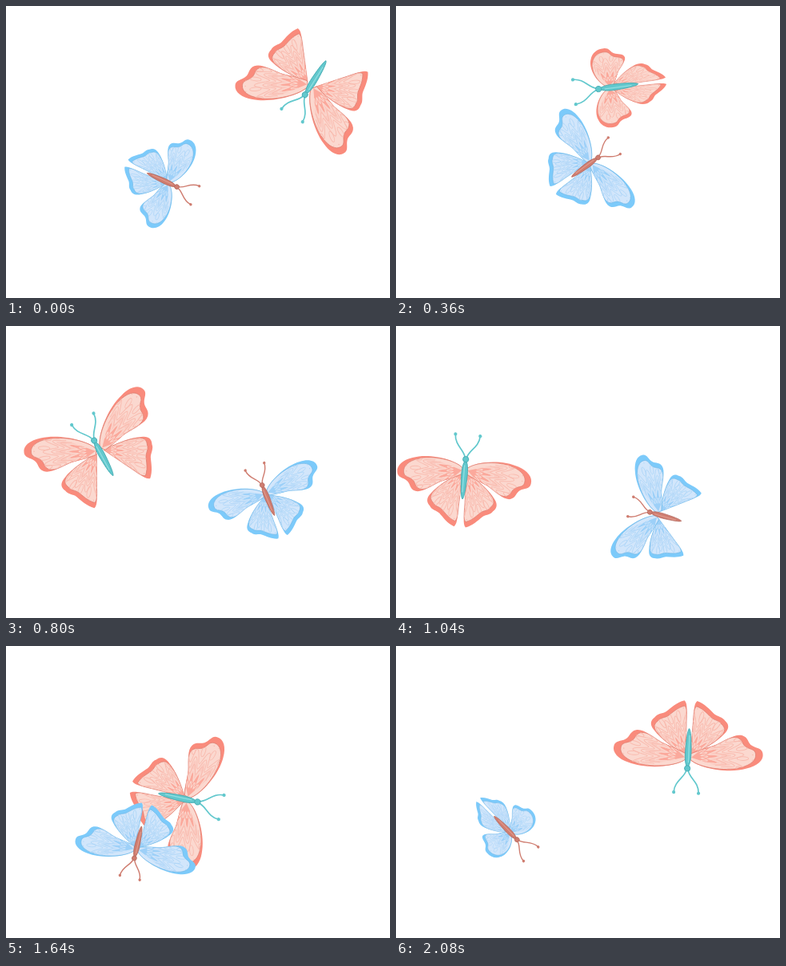
Recreate the animation shown at these times as an HTML page with a canvas. Size 480 by 366 pixels, loop 2.12 s.

```html
<!DOCTYPE html>
<html>
<head>
<meta charset="utf-8">
<style>
html, body { margin: 0; width: 100%; height: 100%; overflow: hidden; background: #fff; }
canvas { display: block; }
</style>
</head>
<body>
<canvas id="stage" width="480" height="366"></canvas>
<script>
const ctx = document.getElementById('stage').getContext('2d');
const STEP = 40, STEPS = 53, PERIOD = 56, RAD = Math.PI / 180;

// Right wing at rest, butterfly heading up, body centred on the origin.
const FORE = {
  shape: new Path2D('M3-14C15-24 52-28 74-20C87-16 95-8 93 0C92 7 84 6 79 9C73 12 74 19 66 21C56 23 46 13 34 7C22 2 10-2 3-6Z'),
  base: [4, -11], from: -14, to: 42, size: 92
};
const HIND = {
  shape: new Path2D('M3-8C14-2 34 8 45 22C50 28 49 33 44 37C41 42 34 42 30 45C24 50 18 57 8 60C3 56 5 44 4 30Z'),
  base: [3, -8], from: 32, to: 96, size: 70
};
const BODY = new Path2D('M0-24C4-20 4-8 3.6 0C3.2 10 2.4 22 .4 25C-2 24-3 10-3.6 0C-4-8-4-20 0-24Z');
const ANTENNA = new Path2D('M1-27C3-37 15-41 15.5-55');

// path: step, x, y, heading.  flap: step, wing angle, wing breadth.
const pink = {
  scale: 1, turn: 360,
  rim: '#f98b7c', edge: '#dd7d70', cell: '#fbd8cf', line: '#f9bcb0', heart: '#fb9f90',
  body: '#62c8cd', shade: '#43a9b0', glow: '#8fdde0',
  path: [[0, 387, 90, 122], [9, 278, 101, 173], [15, 178, 138, 215], [26, 85, 192, 275],
    [36, 161, 200, 349], [41, 215, 190, 372.6], [52, 365.5, 128.5, 453]],
  flap: [[0, 40, 1], [9, 8, .53], [15, 7, .97], [19, 36, 1], [26, 1, .9], [28, 4, .53],
    [36, 22, .98], [38, 32, 1], [41, 20, .92], [46.5, 6, .53], [52, 1, 1]]
};
const blue = {
  scale: .82, turn: -360,
  rim: '#7ccafa', edge: '#6db4e4', cell: '#d2e6fb', line: '#aed6f8', heart: '#92cdf8',
  body: '#cf7d70', shade: '#b0655a', glow: '#e09a8c',
  path: [[0, 195, 218, 25], [9, 236, 202, -36], [15, 275, 203, -73], [21, 335, 222, -120],
    [26, 337, 239, -164], [36, 241, 251, -215], [41, 165, 246, -257], [52, 137, 228, -314]],
  flap: [[0, 8, .78], [5, 30, 1], [9, 14, .98], [15, 0, .53], [20, 14, .95], [26, 39, 1],
    [33.5, 8, .53], [36, 15, .88], [41, 11, 1], [45, 34, 1], [52, 5, .5]]
};

// Smooth curve through the keys; column i gains `turn` with every period.
function curve(keys, i, time, turn = 0) {
  const n = keys.length;
  const at = k => {
    const lap = Math.floor(k / n), key = keys[k - lap * n];
    return [key[0] + lap * PERIOD, key[i] + lap * turn];
  };
  let k = n - 1;
  while (keys[k][0] > time) k--;
  const [a, b, c, d] = [at(k - 1), at(k), at(k + 1), at(k + 2)];
  const slope = (p, q) => (q[1] - p[1]) / (q[0] - p[0]);
  const span = c[0] - b[0], u = (time - b[0]) / span, v = 1 - u;
  return v * v * (1 + 2 * u) * b[1] + u * u * (3 - 2 * u) * c[1] +
    span * u * v * (v * slope(a, c) - u * slope(b, d));
}

function scallop(wing, radius, lobes, depth, close) {
  const span = wing.to - wing.from;
  ctx.beginPath();
  if (close) ctx.moveTo(0, 0);
  for (let i = 0; i <= 48; i++) {
    const angle = (wing.from + span * i / 48) * RAD;
    const r = wing.size * radius * (1 - depth * Math.cos(i / 48 * lobes * 2 * Math.PI));
    ctx.lineTo(r * Math.cos(angle), r * Math.sin(angle));
  }
}

function drawWing(wing, look, angle) {
  ctx.save();
  ctx.translate(2, -13);
  ctx.rotate(-angle * RAD);
  ctx.translate(-2, 13);
  ctx.fillStyle = look.rim;
  ctx.fill(wing.shape);

  const [x, y] = wing.base;
  ctx.translate(x, y);
  ctx.scale(.9, .9);
  ctx.translate(-x, -y);
  ctx.fillStyle = look.cell;
  ctx.fill(wing.shape);
  ctx.strokeStyle = look.edge;
  ctx.lineWidth = .8;
  ctx.stroke(wing.shape);
  ctx.clip(wing.shape);
  ctx.translate(x, y);

  ctx.globalAlpha = .5;
  ctx.fillStyle = look.line;
  scallop(wing, .5, 4, .22, true);
  ctx.fill();
  ctx.globalAlpha = .75;
  ctx.fillStyle = look.heart;
  scallop(wing, .31, 4, .28, true);
  ctx.fill();
  ctx.globalAlpha = 1;

  ctx.lineWidth = 1.1;
  ctx.strokeStyle = look.cell;
  for (const r of [.2, .36]) {
    scallop(wing, r, 4, .25);
    ctx.stroke();
  }
  ctx.strokeStyle = look.line;
  for (const r of [.46, .57, .68]) {
    scallop(wing, r, 4, .17);
    ctx.stroke();
  }

  // Long loops near the margin, with a row of dots outside them.
  ctx.fillStyle = look.line;
  for (let i = 0; i < 5; i++) {
    const a = (wing.from + (wing.to - wing.from) * (i + .5) / 5) * RAD;
    const r = wing.size * .78;
    ctx.beginPath();
    ctx.ellipse(r * Math.cos(a), r * Math.sin(a), 8, 2.6, a, 0, 7);
    ctx.stroke();
  }
  for (let i = 0; i < 12; i++) {
    const a = (wing.from + (wing.to - wing.from) * i / 11) * RAD;
    const r = wing.size * .93;
    ctx.beginPath();
    ctx.arc(r * Math.cos(a), r * Math.sin(a), .9, 0, 7);
    ctx.fill();
  }
  ctx.restore();
}

function drawBody(look) {
  ctx.lineCap = 'round';
  for (const side of [-1, 1]) {
    ctx.save();
    ctx.scale(side, 1);
    ctx.strokeStyle = ctx.fillStyle = look.body;
    ctx.lineWidth = 1.7;
    ctx.stroke(ANTENNA);
    ctx.beginPath();
    ctx.arc(15.5, -55.5, 2.1, 0, 7);
    ctx.fill();
    ctx.restore();
  }
  ctx.fillStyle = look.body;
  ctx.strokeStyle = look.shade;
  ctx.lineWidth = .8;
  ctx.fill(BODY);
  ctx.stroke(BODY);
  ctx.beginPath();
  ctx.arc(0, -25, 3.6, 0, 7);
  ctx.fill();
  ctx.stroke();
  ctx.strokeStyle = look.glow;
  ctx.lineWidth = 1.4;
  ctx.beginPath();
  ctx.moveTo(-.8, -17);
  ctx.lineTo(-.6, 16);
  ctx.stroke();
}

function drawButterfly(fly, time) {
  const angle = curve(fly.flap, 1, time);
  const breadth = Math.min(1.02, curve(fly.flap, 2, time));
  ctx.save();
  ctx.translate(curve(fly.path, 1, time), curve(fly.path, 2, time));
  ctx.rotate((curve(fly.path, 3, time, fly.turn) + 90) * RAD);
  ctx.scale(fly.scale, fly.scale);
  for (const side of [-1, 1]) {
    ctx.save();
    ctx.scale(side * breadth, 1);
    drawWing(HIND, fly, Math.max(0, 2 * angle - 42));
    drawWing(FORE, fly, angle);
    ctx.restore();
  }
  drawBody(fly);
  ctx.restore();
}

function draw() {
  const time = Math.floor(performance.now() / STEP) % STEPS;
  ctx.clearRect(0, 0, 480, 366);
  drawButterfly(pink, time);
  drawButterfly(blue, time);
  requestAnimationFrame(draw);
}
draw();
</script>
</body>
</html>
```
